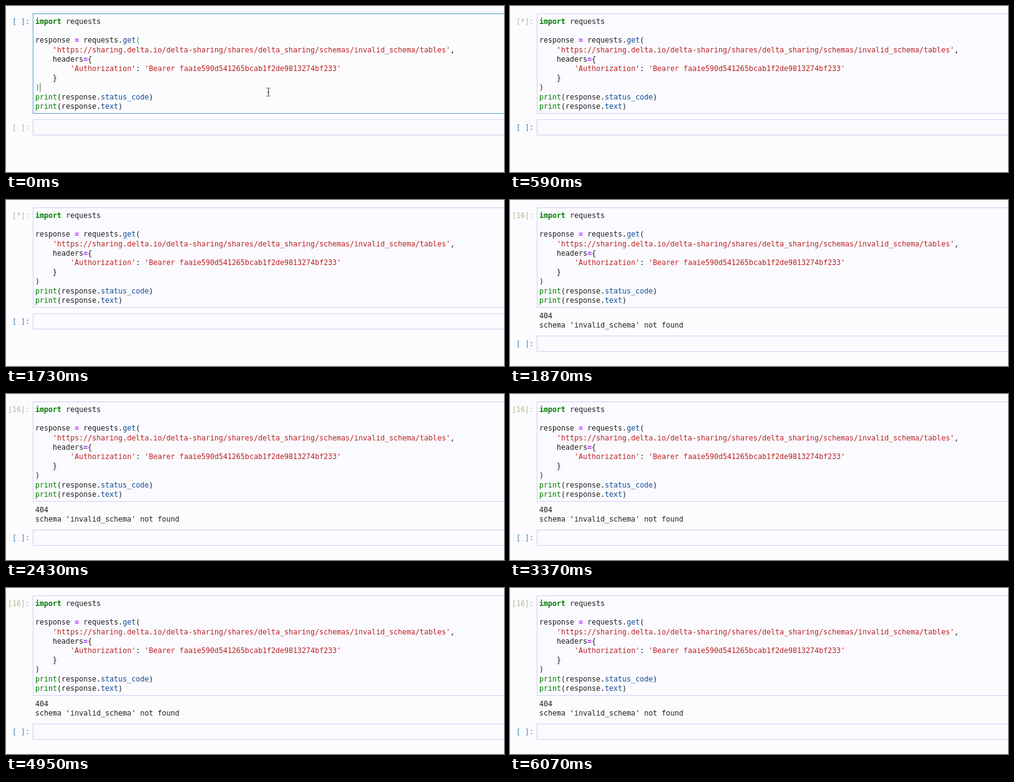
These frames come from a looping animation (800x268 px, 6090 ms). An HTML page:

```html
<!DOCTYPE html>
<html lang="en">
<head>
<meta charset="utf-8">
<title>Notebook request</title>
<style>
  html, body { margin: 0; width: 100%; height: 100%; overflow: hidden; background: #fcfcff; }
  svg { display: block; width: 800px; height: 268px; }
  text { font: 11.66px "DejaVu Sans Mono", "Liberation Mono", monospace; white-space: pre; fill: #202020; }
  .kw { fill: #008000; font-weight: bold; }
  .fn { fill: #008000; }
  .op { fill: #aa22ff; font-weight: bold; }
  .str { fill: #ba2121; }
  .prop { fill: #0f4c94; }
  .editing .match { fill: #00a030; }
  .prompt { text-anchor: end; fill: #b3b591; }
  .prompt.on { fill: #347bab; }
  .cell { fill: #fafaff; stroke: #d0d0f3; }
  .cell.edit { fill: #fcfcff; stroke: #559fca; }
</style>
</head>
<body>
<svg viewBox="0 0 800 268">
  <rect id="cell1" class="cell" x="43.5" y="12.5" width="770" height="161"/>
  <rect id="cell2" class="cell" x="43.5" width="770" height="25"/>
  <text id="prompt1" class="prompt" x="38" y="29"></text>
  <text id="prompt2" class="prompt" x="38">[ ]:</text>
  <g id="code"></g>
  <g id="output">
    <text x="47" y="191">404</text>
    <text x="47" y="206">schema 'invalid_schema' not found</text>
  </g>
  <g id="cursors" fill="none" stroke="#333">
    <path d="M55 124.5V138.5" stroke="#555"/>
    <path d="M418.5 132.5h2l1 1l1-1h2M421.5 133v12M418.5 145.5h2l1-1l1 1h2M420 139.5h3"/>
  </g>
</svg>
<script>
const LOOP = 6090;
const $ = id => document.getElementById(id);

// Each line is a list of [text, class] runs.
const lines = [
  [['import', 'kw'], [' requests']],
  [],
  [['response '], ['=', 'op'], [' requests.'], ['get', 'prop'], ['(', 'match']],
  [['    '], ["'https://sharing.delta.io/delta-sharing/shares/delta_sharing/schemas/invalid_schema/tables'", 'str'], [',']],
  [['    headers'], ['=', 'op'], ['{']],
  [['        '], ["'Authorization'", 'str'], [': '], ["'Bearer faaie590d541265bcab1f2de9813274bf233'", 'str']],
  [['    }']],
  [[')', 'match']],
  [['print', 'fn'], ['(response.'], ['status_code', 'prop'], [')']],
  [['print', 'fn'], ['(response.'], ['text', 'prop'], [')']]
];

function add(parent, tag, attrs) {
  const el = document.createElementNS('http://www.w3.org/2000/svg', tag);
  for (const key in attrs) el.setAttribute(key, attrs[key]);
  return parent.appendChild(el);
}

lines.forEach((runs, i) => {
  const row = add($('code'), 'text', { x: 47, y: 29 + 15.2 * i });
  for (const [text, cls = ''] of runs) add(row, 'tspan', { class: cls }).textContent = text;
});

const states = [
  { at: 0, prompt: '[ ]:', editing: true, done: false },
  { at: 540, prompt: '[*]:', editing: false, done: false },
  { at: 1830, prompt: '[16]:', editing: false, done: true }
];
let shown;

function show(s) {
  if (s === shown) return;
  shown = s;
  const top = s.done ? 219 : 183;
  $('prompt1').textContent = s.prompt;
  $('prompt1').classList.toggle('on', s.editing);
  $('prompt2').classList.toggle('on', !s.editing);
  $('prompt2').setAttribute('y', top + 17);
  $('cell2').setAttribute('y', top + 0.5);
  $('cell1').classList.toggle('edit', s.editing);
  $('code').classList.toggle('editing', s.editing);
  $('cursors').style.display = s.editing ? '' : 'none';
  $('output').style.display = s.done ? '' : 'none';
}

function tick() {
  const t = performance.now() % LOOP;
  show(states.filter(s => s.at <= t).pop());
  requestAnimationFrame(tick);
}
tick();
</script>
</body>
</html>
```
